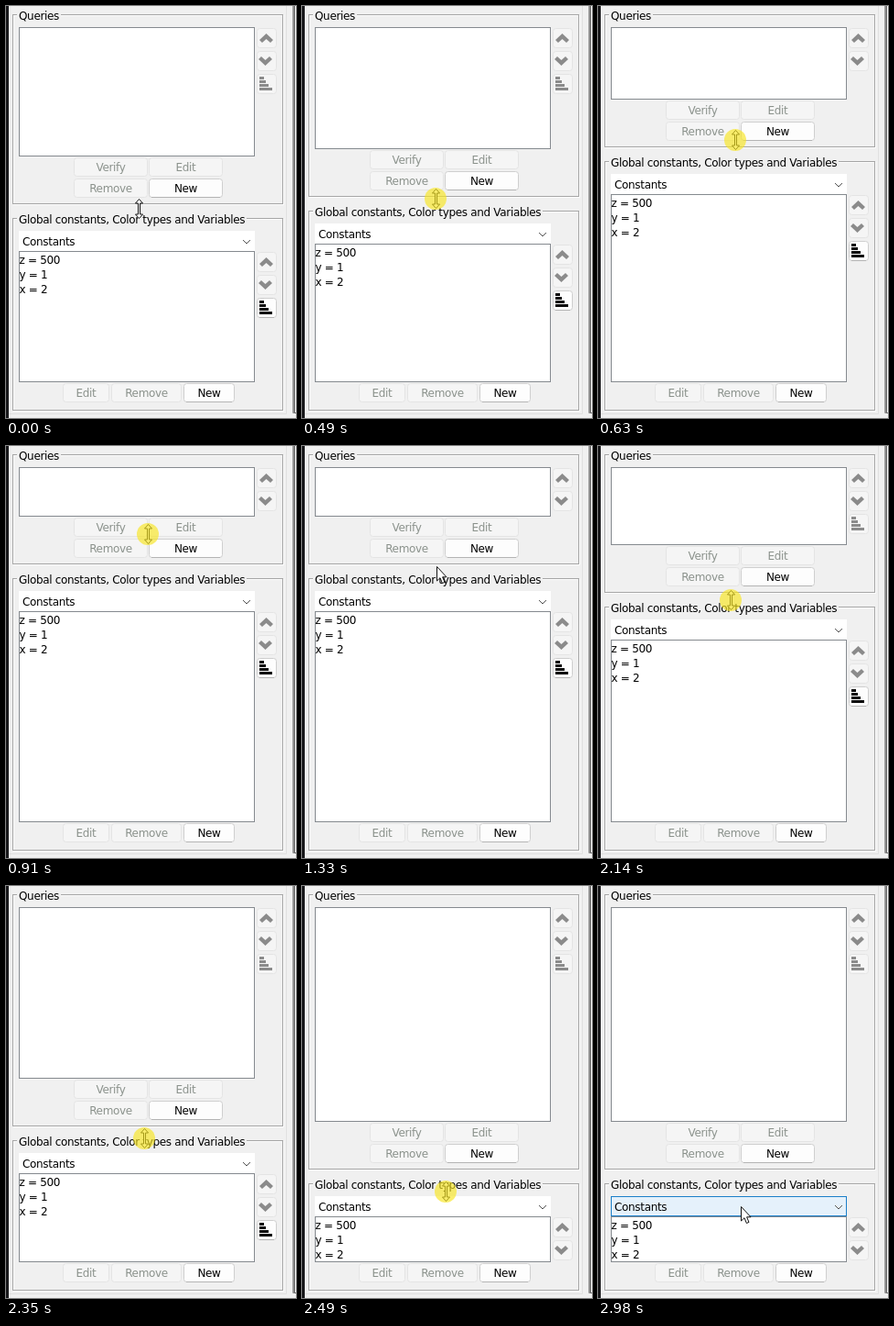
These frames come from a looping animation (317 by 449 pixels, 3.05 s). An HTML page:

```html
<!DOCTYPE html>
<html lang="en">
<head>
<meta charset="utf-8">
<title>Resizable panels</title>
<style>
  html, body { margin: 0; width: 100%; height: 100%; overflow: hidden; background: #f0f0f0; }
  svg { display: block; width: 100vw; height: 100vh; }
  text { font: 12px "DejaVu Sans", sans-serif; letter-spacing: -.33px; fill: #000; }
  .mid { text-anchor: middle; }
  .off text { fill: #8b928c; }
  .face { fill: #f0f0f0; }
  .btn { fill: #fdfdfd; stroke: #cfcfcf; }
  .off .btn { fill: #f5f5f5; stroke: #e4e4e4; }
  .shade { stroke: #b4b4b4; }
  .icon { fill: #080808; }
  .off .icon { fill: #8b8b8b; }
  .list { fill: #fff; stroke: #858a8f; }
  .edge { fill: none; stroke: #a6a6a6; }
  .glow { fill: none; stroke: #fcfcfc; }
  .combo { fill: #fff; stroke: #fff; }
  .combo.hover { fill: #e5f1fb; stroke: #1b7fc9; }
  .pointer { fill: #fff; stroke: #111; stroke-width: 1; }
</style>
</head>
<body>
<svg id="stage" viewBox="0 0 317 449"></svg>
<script>
const LOOP = 3050, STEP = 70;
const stage = document.getElementById('stage');

function add(parent, tag, attrs = {}, label) {
  const el = document.createElementNS('http://www.w3.org/2000/svg', tag);
  set(el, attrs);
  if (label) el.textContent = label;
  parent.append(el);
  return el;
}
function set(el, attrs) {
  for (const key in attrs) el.setAttribute(key, attrs[key]);
}
const group = (parent, cls = '') => add(parent, 'g', { class: cls });
const rect = (parent, x, y, width, height, cls, rx = 0) =>
  add(parent, 'rect', { x, y, width, height, class: cls, rx });
const line = (parent, d, stroke) => add(parent, 'path', { d, stroke, fill: 'none' });
const label = (parent, x, y, str, cls = '') => add(parent, 'text', { x, y, class: cls }, str);
const show = (el, on) => set(el, { visibility: on ? 'visible' : 'hidden' });
const shift = (el, x, y) => set(el, { transform: `translate(${x} ${y})` });

// Button face; enabled ones have a darker lower edge.
function face(parent, x, y, width, height, enabled) {
  rect(parent, x, y, width, height, 'btn', 3);
  if (enabled) add(parent, 'path', { d: `M${x + 2.5} ${y + height}h${width - 5}`, class: 'shade' });
}

function button(parent, x, y, width, str, enabled) {
  const g = group(parent, enabled ? '' : 'off');
  face(g, x + .5, y + .5, width, 20, enabled);
  label(g, x + width / 2 + .5, y + 15, str, 'mid');
}

const UP = 'M-7.5 2L0-5 7.5 2 4.5 5 0 1-4.5 5Z';
const DOWN = 'M-8.5-2L-1 5 6.5-2 3.5-5-1-1-5.5-5Z';
const BARS = [5, 7, 10, 14].map((w, i) => `M-7.5 ${i * 4 - 8}h${w}v3h${-w}z`).join('');

// Up, down and sort buttons beside a list; returns the sort button.
function sideButtons(parent, top, sortable) {
  const make = (row, d, enabled) => {
    const g = group(parent, enabled ? '' : 'off');
    shift(g, 284.5, top + 12 + row * 25);
    face(g, -10, -10.5, 21, 21, enabled);
    add(g, 'path', { d, class: 'icon' });
    return g;
  };
  make(0, UP, false);
  make(1, DOWN, false);
  return make(2, BARS, sortable);
}

// Etched frame: a light line one pixel inside a grey one.
function frame(parent) {
  return [rect(parent, 8.5, 0, 295, 0, 'glow'), rect(parent, 7.5, 0, 295, 0, 'edge')];
}
function sizeFrame([glow, edge], top, bottom) {
  set(edge, { y: top + .5, height: bottom - top });
  set(glow, { y: top + 1.5, height: bottom - top });
}

rect(stage, 0, 0, 317, 449, 'face');
rect(stage, 0, 0, 3, 449).setAttribute('fill', '#18181b');
line(stage, 'M306.5 0V444.5H3', '#e0e0e0');

// Sunken edge of the neighbouring pane
rect(stage, 316, 0, 1, 443).setAttribute('fill', '#fff');
['#a0a0a0', '#8a8a8a', '#696969'].forEach((tone, i) =>
  line(stage, `M${313.5 + i} 0V443.5H317`, tone));

const upperFrame = frame(stage), lowerFrame = frame(stage);

// Queries
rect(stage, 12, 5, 48, 12, 'face');
label(stage, 14, 15, 'Queries');
const upperList = rect(stage, 14.5, 23.5, 257, 140, 'list');
const upperSort = sideButtons(stage, 23, false);
const upperButtons = group(stage);
button(upperButtons, 74, 165, 80, 'Verify');
button(upperButtons, 156, 165, 80, 'Edit');
button(upperButtons, 74, 188, 80, 'Remove');
button(upperButtons, 156, 188, 80, 'New', true);

// Constants
const lowerList = rect(stage, 14.5, 0, 257, 0, 'list');
const lower = group(stage);
rect(lower, 12, 227, 251, 12, 'face');
label(lower, 14, 237, 'Global constants, Color types and Variables');
const combo = rect(lower, 14.5, 245.5, 257, 21, 'combo');
label(lower, 18, 261, 'Constants');
line(lower, 'M259 255l4 4 4-4', '#555');
['z = 500', 'y = 1', 'x = 2'].forEach((row, i) => label(lower, 14.5, 281 + i * 16, row));
const lowerSort = sideButtons(lower, 267, true);
button(stage, 62, 411, 50, 'Edit');
button(stage, 115, 411, 76, 'Remove');
button(stage, 194, 411, 55, 'New', true);

// Mouse
const mouse = group(stage);
const resize = add(mouse, 'path', {
  class: 'pointer',
  d: 'M.5-10.5L4.5-6H1.5V6H4.5L.5 10.5-3.5 6H-.5V-6H-3.5Z'
});
const arrow = add(mouse, 'path', {
  class: 'pointer',
  d: 'M.5 .5V16L4 12.7 6.4 18.5 9 17.4 6.6 11.8H11Z'
});
const press = add(mouse, 'circle', { r: 12, fill: '#f7e51e', opacity: .65 });

// time, x, y
const mousePath = [
  [0, 145, 221], [420, 145, 221], [490, 146, 210], [630, 150, 146], [700, 151, 118],
  [840, 154, 98], [980, 155, 94], [1050, 155, 94], [1330, 147, 131], [1590, 147, 131],
  [1660, 146, 132], [1730, 145, 133], [2000, 145, 133], [2140, 145, 168],
  [2350, 151, 275], [2490, 157, 333], [2560, 157, 333], [2980, 156, 349]
];
// time, divider offset
const splitPath = [
  [0, 0], [420, 0], [490, -8], [630, -62], [700, -87], [2000, -87],
  [2140, -56], [2350, 46], [2420, 80], [2490, 93]
];

function sample(path, t, col) {
  const i = path.findIndex(p => p[0] > t);
  if (i < 0) return path[path.length - 1][col];
  const a = path[i - 1], b = path[i];
  return Math.round(a[col] + (b[col] - a[col]) * (t - a[0]) / (b[0] - a[0]));
}

// The screen refreshes in steps, restarting after each pause.
function snap(t) {
  const start = t >= 2000 ? 2000 : t >= 1660 ? 1660 : 0;
  return start + Math.floor((t - start) / STEP) * STEP;
}
const within = (t, from, to) => t >= from && t < to;

function draw(now) {
  const t = snap(now % LOOP);
  const split = sample(splitPath, t, 1);
  const x = sample(mousePath, t, 1), y = sample(mousePath, t, 2);
  const pointing = within(t, 1120, 1660) || t >= 2630;

  sizeFrame(upperFrame, 9, 215 + split);
  sizeFrame(lowerFrame, 231 + split, 440);
  set(upperList, { height: 140 + split });
  set(lowerList, { y: 267.5 + split, height: 142 - split });
  shift(upperButtons, 0, split);
  shift(lower, 0, split);
  show(upperSort, 140 + split >= 80);
  show(lowerSort, 142 - split >= 80);

  combo.classList.toggle('hover', pointing && y >= 246 + split);
  shift(mouse, x, y);
  show(arrow, pointing);
  show(resize, !pointing);
  show(press, within(t, 350, 1050) || within(t, 2000, 2560));
}

const begin = performance.now();
function tick() {
  draw(performance.now() - begin);
  requestAnimationFrame(tick);
}
tick();
</script>
</body>
</html>
```
